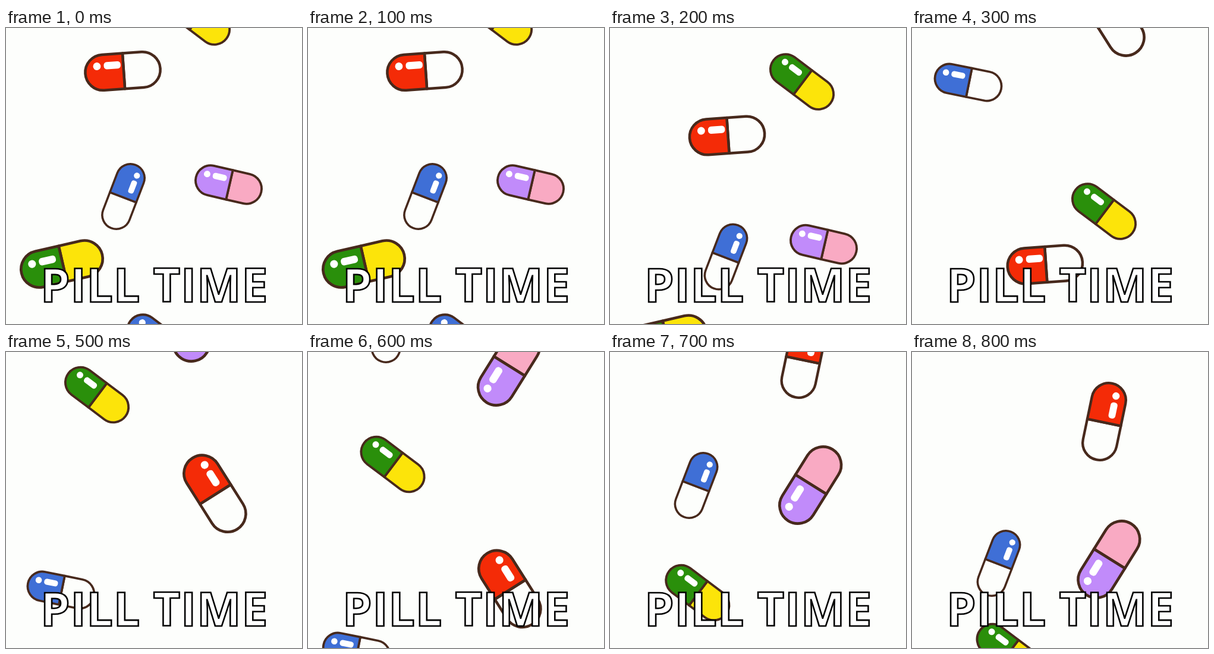
Write an HTML page that moves like this. It is 498 px wide and 498 px high and loops after 900 ms.

```html
<!DOCTYPE html>
<html lang="en">
<head>
<meta charset="utf-8">
<title>Pill time</title>
<style>
html, body { margin: 0; width: 100%; height: 100%; overflow: hidden; background: #fdfefc; }
svg { display: block; width: 100%; height: 100%; }
text {
  font: 700 79px "Open Sans", sans-serif; letter-spacing: 0.8px;
  fill: #fff; stroke: #000; stroke-width: 2.6;
}
</style>
</head>
<body>
<svg viewBox="0 0 498 498">
  <g id="pills"></g>
  <text x="58" y="461">PILL TIME</text>
</svg>
<script>
const STEP = 100, STEPS = 9, TICKS_PER_STEP = 1.5, FALL = 105;
const INK = '#47291c', WHITE = '#fdfefc';
const red = ['#f42b07', WHITE], blue = ['#3f6fd6', WHITE],
      green = ['#2a8f0b', '#fce40a'], purple = ['#c18bfa', '#f9aac3'];
const layer = document.getElementById('pills');
const pills = [];

function add(parent, tag, attrs) {
  const el = document.createElementNS('http://www.w3.org/2000/svg', tag);
  for (const key in attrs) el.setAttribute(key, attrs[key]);
  return parent.appendChild(el);
}

// w: outer thickness, d: distance between the cap centres
function makePill([front, back], w, d) {
  const g = add(layer, 'g', {});
  const line = w * 0.07, r = (w - line) / 2, mid = 1.5;
  const half = (sign, fill) => add(g, 'path', {
    d: `M${mid} ${-r}H${sign * d / 2}a${r} ${r} 0 0 ${sign > 0 ? 1 : 0} 0 ${2 * r}H${mid}Z`,
    fill, stroke: INK, 'stroke-width': line, 'stroke-linejoin': 'round'
  });
  half(1, back);
  half(-1, front);
  const y = -w * 0.17, dot = -d / 2 - w * 0.15, bar = dot + w * 0.4;
  add(g, 'circle', { cx: dot, cy: y, r: w * 0.1, fill: '#fff' });
  add(g, 'rect', {
    x: bar - w * 0.22, y: y - w * 0.095, width: w * 0.44, height: w * 0.19,
    rx: w * 0.08, fill: '#fff'
  });
  return g;
}

// A pill enters at a tick and falls with speed v and acceleration a per tick
function drop(colours, w, d, angle, start, [x, y], [vx, vy] = [0, FALL], [ax, ay] = [0, 0]) {
  const el = makePill(colours, w, d);
  pills.push(tick => {
    const k = tick - start;
    el.setAttribute('display', k < 0 ? 'none' : 'inline');
    const px = x + vx * k + ax * k * k, py = y + vy * k + ay * k * k;
    el.setAttribute('transform', `translate(${px} ${py}) rotate(${angle})`);
  });
}

drop(green, 55, 69, 37, 0, [323, -18.5], [0, 109]);
drop(red, 64.5, 66.5, -4, 0, [196.5, 72.5], [-3.8, 108.5], [4.3, 0]);
drop(blue, 51, 66.5, 111, 0, [197.5, 283.5], [-2.5, 101.5]);
drop(purple, 54.5, 62, 13, 0, [374.5, 263.5], [-15, 100.5]);
drop(green, 66, 78, -13, 0, [94, 397], [0, 126]);
drop(blue, 56, 62, 37, 0, [255, 527]);
drop(blue, 53, 64, 11.5, 3, [94.5, 91.5], [6.8, 103], [-2.5, 0]);
drop(red, 66, 80, 57.7, 3, [338.5, -18], [16.6, 29.3], [-4.1, 18.7]);
drop(green, 55, 69, 37, 6, [153, 72], [-14.8, 120], [4.3, -3]);
drop(purple, 66, 80, -58, 6, [333, -49], [6.8, 65.5], [-1.8, 8.5]);
drop(blue, 51, 66.5, 111, 7, [143, -37.5], [1, 131]);
drop(red, 62, 73.5, 101.8, 9, [325, 12], [-1.5, FALL]);

// Steps advance one and two ticks in turn, after a hold at the start
function draw(time) {
  const step = Math.floor(time / STEP) % STEPS;
  const tick = Math.max(0, Math.floor((step - 1) * TICKS_PER_STEP));
  for (const place of pills) place(tick);
}

function loop() {
  draw(performance.now());
  requestAnimationFrame(loop);
}
loop();
</script>
</body>
</html>
```
